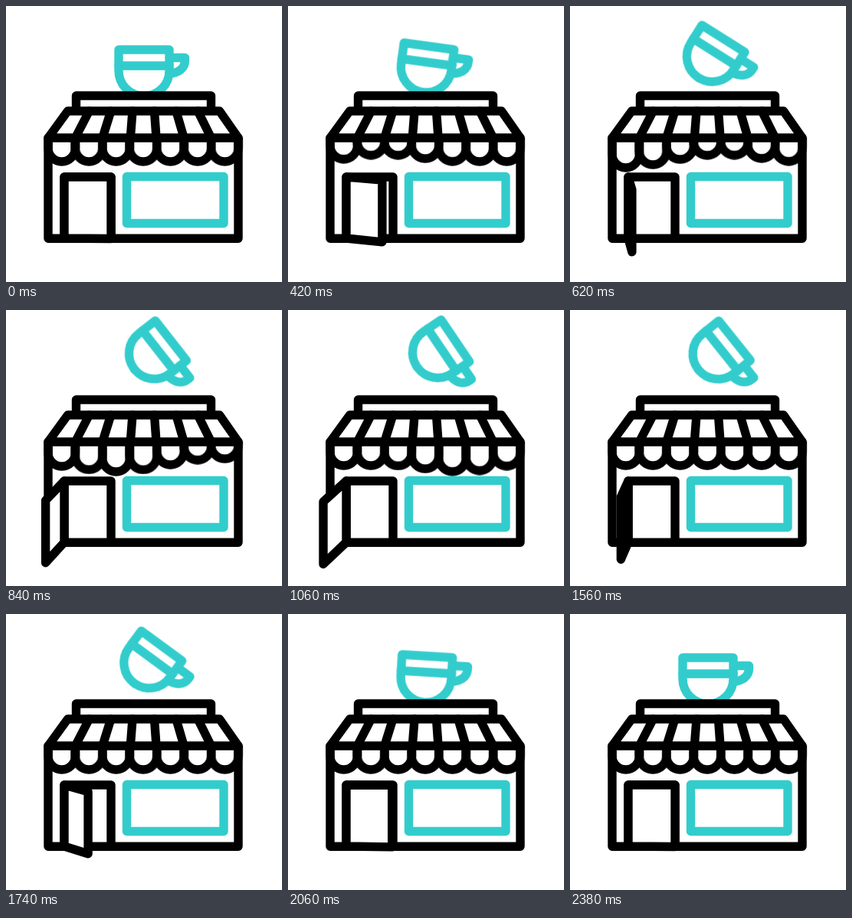
These frames come from a looping animation (360x360 px, 2.4 s). An HTML page:

```html
<!DOCTYPE html>
<html lang="en">
<head>
<meta charset="utf-8">
<title>Coffee shop</title>
<style>
  html, body { margin: 0; height: 100%; overflow: hidden; background: #fff; }
  svg {
    display: block; width: 100vw; height: 100vh;
    fill: none; stroke: #000; stroke-width: 11.4;
    stroke-linejoin: round; stroke-linecap: round;
    --ease: cubic-bezier(.66, 0, .34, 1);
  }
  .teal { stroke: #33cccc; }
  .white { fill: #fff; }

  .cup {
    transform-origin: 215px 84.5px;
    animation: tip 2400ms var(--ease) infinite;
  }
  .door { animation: swing 2400ms var(--ease) infinite; }
  .flap {
    animation: wave 2400ms cubic-bezier(.37, 0, .63, 1) infinite;
    animation-delay: calc(var(--i) * 98ms);
  }

  @keyframes tip {
    0%, 3.75% { transform: rotate(0deg); }
    45.833%, 53.542% { transform: rotate(56deg); }
    96.042%, 100% { transform: rotate(0deg); }
  }
  @keyframes swing {
    0%, 3.333% { d: path("M76 223L137 223L137 303.5L76 303Z"); }
    45%, 48.5% { d: path("M76 223L46 250L46 331.5L76 303Z"); }
    91.25%, 100% { d: path("M76 223L137 223L137 303.5L76 303Z"); }
  }
  @keyframes wave {
    0% { transform: translateY(0); }
    11.5% { transform: translateY(-9px); }
    26.667% { transform: translateY(8px); }
    37.5%, 100% { transform: translateY(0); }
  }
</style>
</head>
<body>
<svg viewBox="0 0 360 360">
  <defs>
    <clipPath id="below"><rect y="172" width="360" height="100"/></clipPath>
    <path id="flap" d="M55 155V185.3a17.71 17.71 0 0 0 35.43 0V155"/>
  </defs>

  <g class="cup teal">
    <path d="M213 67.5H233.5V71C233.5 81 225 88 212 88"/>
    <path class="white" d="M147 57H213V84.5a33 33 0 0 1-66 0Z"/>
    <path d="M147 78H213"/>
  </g>

  <path class="white" d="M91.5 137V117H267.5V137"/>
  <path d="M55 172V303.3H303V172"/>

  <g clip-path="url(#below)">
    <use class="flap" href="#flap" style="--i:0"/>
    <use class="flap" href="#flap" x="35.43" style="--i:1"/>
    <use class="flap" href="#flap" x="70.86" style="--i:2"/>
    <use class="flap" href="#flap" x="106.29" style="--i:3"/>
    <use class="flap" href="#flap" x="141.71" style="--i:4"/>
    <use class="flap" href="#flap" x="177.14" style="--i:5"/>
    <use class="flap" href="#flap" x="212.57" style="--i:6"/>
  </g>

  <path class="white" d="M80.5 137H278.5L303 172H55Z"/>
  <path d="M108.5 137L90.4 172M136.8 137L125.9 172M165 137L162.3 172
           M193.5 137L196 172M221.9 137L232.1 172M250.2 137L267.6 172"/>

  <rect class="teal" x="157.5" y="222.5" width="126.5" height="61"/>

  <path d="M76 303V223H137V303"/>
  <path class="door white" d="M76 223L137 223L137 303.5L76 303Z"/>
</svg>
</body>
</html>
```
